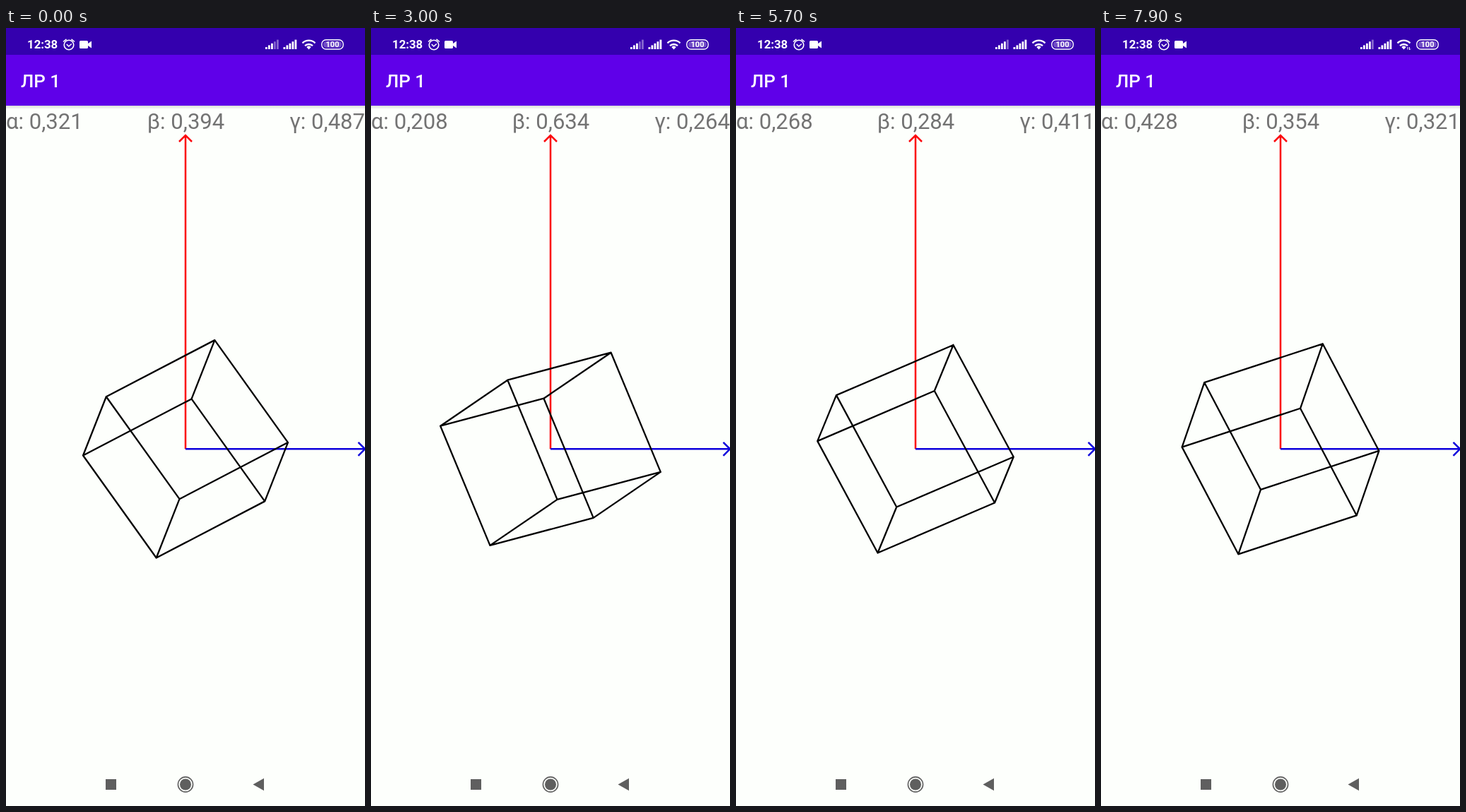
Write an HTML page that moves like this. It is 508 px wide and 1102 px high and loops after 8000 ms.

```html
<!DOCTYPE html>
<html lang="ru">
<head>
<meta charset="utf-8">
<title>ЛР 1</title>
<style>
html, body { margin: 0; width: 100%; height: 100%; overflow: hidden; background: #fdfffc; }
svg { display: block; width: 508px; height: 1102px; font-family: Roboto, sans-serif; }
.angle { font-size: 31.05px; fill: #737373; }
.line { fill: none; stroke-width: 2.5; }
</style>
</head>
<body>
<svg viewBox="0 0 508 1102">
  <defs>
    <linearGradient id="shade" x2="0" y2="1">
      <stop offset="0" stop-color="#000" stop-opacity=".14"/>
      <stop offset="1" stop-color="#000" stop-opacity="0"/>
    </linearGradient>
  </defs>
  <rect width="508" height="1102" fill="#fdfffc"/>
  <rect y="110" width="508" height="5" fill="url(#shade)"/>
  <rect y="38" width="508" height="72" fill="#5f00e9"/>
  <rect width="508" height="38" fill="#3400ae"/>

  <g fill="#fff">
    <text x="30" y="29.3" font-size="16.8" font-weight="700">12:38</text>
    <text x="21" y="84" font-size="25.9" font-weight="500">ЛР 1</text>
    <path d="M104 19.5q0-1.5 1.500-1.500h9q1.500 0 1.500 1.500v2.500l5-3.500v10l-5-3.500v2.500q0 1.500-1.500 1.500h-9q-1.500 0-1.500-1.500z"/>
    <g fill="none" stroke="#fff" stroke-width="1.6">
      <circle cx="89" cy="24" r="6.800"/>
      <path d="M81 19.500l4.500-3.700M97 19.500l-4.500-3.700M85.800 23l3 3 4-3.500"/>
      <g stroke-width="2.300">
        <path d="M419.500 21.300a13 13 0 0 1 18 0M423 25.200a8 8 0 0 1 11 0"/>
      </g>
      <rect x="446.800" y="16.800" width="30.400" height="13.200" rx="6" stroke-width="1.400"/>
    </g>
    <path d="M428.500 30.500l-3.200-3.500a4.800 4.800 0 0 1 6.400 0z"/>
    <rect x="449" y="19" width="26" height="8.800" rx="4" opacity=".3"/>
    <text x="462" y="27.300" font-size="11" font-weight="700" text-anchor="middle">100</text>
    <g id="bars"></g>
    <path id="traffic" fill="none" stroke="#fff"/>
  </g>

  <text class="angle" x="0" y="143.300"></text>
  <text class="angle" x="254.500" y="143.300" text-anchor="middle"></text>
  <text class="angle" x="508" y="143.300" text-anchor="end"></text>

  <path class="line" stroke="#fb0007" d="M254 596.300V152M245 161l9-9 9 9"/>
  <path class="line" stroke="#0d00dc" d="M254 596.300H508M498.500 586.800l9.500 9.500-9.500 9.500"/>
  <path id="cube" class="line" stroke="#000" stroke-linecap="round" style="stroke-width:2.300"/>

  <g fill="#5f5f5f">
    <rect x="141" y="1064" width="15" height="15"/>
    <circle cx="254" cy="1071.500" r="8"/>
    <circle cx="254" cy="1071.500" r="10.600" fill="none" stroke="#5f5f5f" stroke-width="1.600"/>
    <path d="M349.500 1071.500l15.500-8.700v17.400z"/>
  </g>
</svg>
<script>
const LOOP = 8000, STEP = 100;
const times = [500, 1700, 3000, 4200, 5700, 7000, 7900];
const tracks = [
  { name: 'α', keys: [.321, .208, .208, -.115, .268, .339, .428] },
  { name: 'β', keys: [.394, .213, .634, .630, .284, -.095, .354] },
  { name: 'γ', keys: [.487, .539, .264, -.374, .411, .521, .321] }
];
const labels = document.querySelectorAll('.angle');
const cube = document.getElementById('cube');
const traffic = document.getElementById('traffic');
const bars = document.getElementById('bars');

const bar = (x, i) => {
  const h = 3 + i * 2.6;
  return `<rect x="${x + i * 4}" y="${30 - h}" width="2.8" height="${h}"/>`;
};
bars.innerHTML = [367, 392.5].map(x => [0, 1, 2, 3, 4].map(i => bar(x, i)).join('')).join('');

// Monotone cubic curve through the keys
function slope(keys, i) {
  const d = j => (keys[j + 1] - keys[j]) / (times[j + 1] - times[j]);
  if (i === 0) return d(0);
  if (i === keys.length - 1) return d(i - 1);
  const a = d(i - 1), b = d(i);
  return a * b > 0 ? 2 * a * b / (a + b) : 0;
}

function valueAt(keys, t) {
  if (t <= times[0]) return keys[0];
  let i = 0;
  while (i < times.length - 2 && t > times[i + 1]) i++;
  const w = times[i + 1] - times[i], u = (t - times[i]) / w, v = 1 - u;
  return v * v * ((1 + 2 * u) * keys[i] + u * w * slope(keys, i))
       + u * u * ((3 - 2 * u) * keys[i + 1] - v * w * slope(keys, i + 1));
}

// Orthographic view of a cube turned about x, then y, then z
function cubePath([a, b, g]) {
  const { sin, cos } = Math;
  const sa = sin(a), ca = cos(a), sb = sin(b), cb = cos(b), sg = sin(g), cg = cos(g);
  const point = n => {
    const [x, y, z] = [1, 2, 4].map(bit => n & bit ? .5 : -.5);
    const px = cg * cb * x - (cg * sb * sa + sg * ca) * y + (sg * sa - cg * sb * ca) * z;
    const py = sg * cb * x + (cg * ca - sg * sb * sa) * y - (sg * sb * ca + cg * sa) * z;
    return (254 + 188.1 * px).toFixed(2) + ' ' + (596.3 - 185.4 * py).toFixed(2);
  };
  let d = '';
  for (let n = 0; n < 8; n++)
    for (const bit of [1, 2, 4])
      if (!(n & bit)) d += `M${point(n)}L${point(n | bit)}`;
  return d;
}

function draw() {
  const t = Math.floor(performance.now() % LOOP / STEP) * STEP;
  const angles = tracks.map(k => valueAt(k.keys, t));
  tracks.forEach((k, i) => {
    labels[i].textContent = `${k.name}: ${angles[i].toFixed(3).replace('.', ',')}`;
  });
  cube.setAttribute('d', cubePath(angles));

  const lit = t < 4600 ? 3 : 4;
  [...bars.children].forEach((r, i) => r.setAttribute('opacity', i < 5 && i >= lit ? .4 : 1));
  traffic.setAttribute('d', t < 6500 ? '' : t < 7400 ? 'M436.500 27v4l-1.500-1.500' : 'M434 27v3.500M436.500 27v4l1.500-1.500');
  requestAnimationFrame(draw);
}
draw();
</script>
</body>
</html>
```
